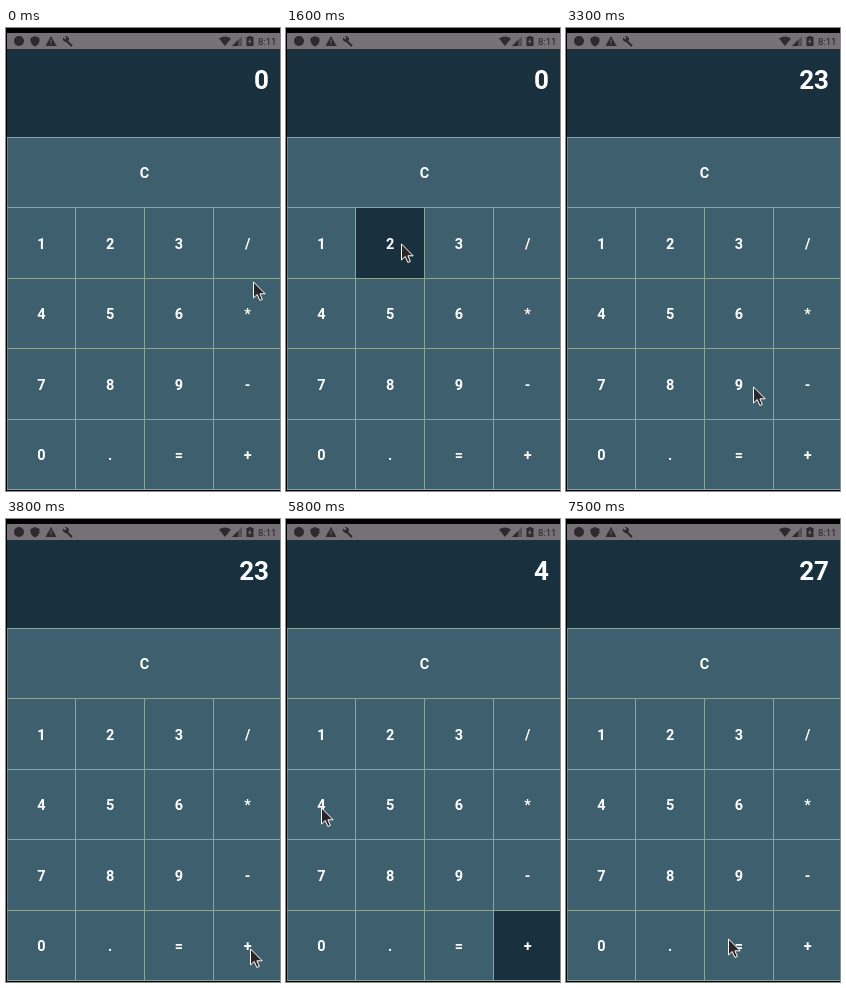
Recreate the animation shown at these times as an HTML page. Size 274x463 px, loop 8 s.

```html
<!DOCTYPE html>
<html lang="en">
<head>
<meta charset="utf-8">
<title>Calculator</title>
<style>
  html, body { margin: 0; width: 100%; height: 100%; overflow: hidden; background: #000; }
  svg { display: block; width: 100%; height: 100%; }
  text { font-family: Roboto, sans-serif; fill: #fff; }
  rect { shape-rendering: crispEdges; }
  #keys text { font-size: 14.5px; font-weight: 700; text-anchor: middle; }
  #display { font-size: 26px; font-weight: 700; text-anchor: end; }
  #clock { font-size: 9.6px; fill: #242226; }
</style>
</head>
<body>
<svg viewBox="0 0 274 463">
  <rect width="274" height="463" fill="#000"/>
  <rect x="1" y="5" width="273" height="16" fill="#757176"/>
  <g fill="#2c2a2d">
    <circle cx="13" cy="13" r="5"/>
    <path d="M29 8L33.5 10V13Q33 16.500 29 18.500Q25 16.500 24.500 13V10Z"/>
    <path d="M45 8L50.500 18H39.500Z"/>
    <path d="M44.500 11.500h1v3h-1zM44.500 15.500h1v1h-1z" fill="#757176"/>
    <path d="M60 12.500L66 18" stroke="#2c2a2d" stroke-width="2.300"/>
    <path d="M57 9.500L59.500 11.500L60.500 9.500L58.500 8Q62.500 7.500 63 11Q62.500 14.500 59 13.800Q56 12.500 57 9.500Z"/>
    <path d="M213 10.500Q219 6.500 225 10.500L219 18Z"/>
    <path d="M236 8V18H226Z" opacity=".45"/>
    <path d="M232 12V18H226Z"/>
    <path d="M242.500 8h3v1h2v9h-7v-9h2z"/>
    <path d="M244.500 10L242 14h1.700l-.7 3 2.700-4h-1.700z" fill="#757176"/>
  </g>
  <text id="clock" x="252" y="17">8:11</text>
  <rect x="1" y="21" width="273" height="88" fill="#19313f"/>
  <text id="display" x="263" y="61">0</text>
  <rect x="1" y="109" width="273" height="353" fill="#8aa59b"/>
  <g id="keys"></g>
  <rect x="1" y="109" width="1" height="353" fill="#8aa59b" opacity=".5"/>
  <path id="cursor" d="M.5 .9V17L4.200 13.500L6.900 19.500L9.400 18.400L6.900 12.800H12.200Z"
        fill="#2e2529" stroke="#fff" stroke-linejoin="round"/>
</svg>
<script>
const LOOP = 8000, TICK = 100;
const keyWidth = 68.75, keyHeight = 70.5, keysLeft = 1, keysTop = 109;
const idle = '#3e5f6d', pressed = '#19313f';

const readings = { 0: '0', 1800: '2', 2900: '23', 4400: '0', 5800: '4', 7500: '27' };
const presses = { 2: [1600, 1900], 3: [2700, 2900], '+': [4200, 7500], 4: [5500, 5800], '=': [7300, 7500] };

// Each move curves from the previous stop through a bend, slowing towards its end
const home = [247, 253];
const moves = [
  { start: 200, end: 1200, bend: [45, 440], to: [115, 215], power: 2 },
  { start: 2000, end: 2500, bend: [155, 235], to: [162, 221], power: 2 },
  { start: 3100, end: 3800, bend: [173, 395], to: [244, 429], power: 2 },
  { start: 4600, end: 5300, bend: [-14, 325], to: [35, 288], power: 3 },
  { start: 6200, end: 7000, bend: [85, 365], to: [162, 419], power: 2 }
];

const byId = id => document.getElementById(id);
const keyRects = {};

function add(tag, attributes, label = '') {
  const node = document.createElementNS('http://www.w3.org/2000/svg', tag);
  for (const name in attributes) node.setAttribute(name, attributes[name]);
  node.textContent = label;
  return byId('keys').appendChild(node);
}

function addKey(label, row, column, span = 1) {
  const columnLine = i => i ? Math.floor(keysLeft + i * keyWidth) : 0;
  const rowLine = i => Math.floor(keysTop + i * keyHeight);
  const x = columnLine(column) + 1, y = rowLine(row) + 1;
  const width = columnLine(column + span) - x, height = rowLine(row + 1) - y;
  keyRects[label] = add('rect', { x, y, width, height, fill: idle });
  add('text', { x: keysLeft + (column + span / 2) * keyWidth, y: y + height / 2 + 5.5 }, label);
}

addKey('C', 0, 0, 4);
['123/', '456*', '789-', '0.=+'].forEach((line, row) =>
  [...line].forEach((label, column) => addKey(label, row + 1, column)));

function pointerAt(time) {
  let from = home;
  for (const { start, end, bend, to, power } of moves) {
    if (time <= start) break;
    const progress = Math.min(1, (time - start) / (end - start));
    const rest = (1 - progress) ** power, done = 1 - rest;
    from = from.map((value, i) => rest * rest * value + 2 * rest * done * bend[i] + done * done * to[i]);
  }
  return from.map(Math.round);
}

function draw(now) {
  const time = Math.floor(now % LOOP / TICK) * TICK;
  const shownSince = Object.keys(readings).filter(start => start <= time).pop();
  byId('display').textContent = readings[shownSince];
  for (const label in presses) {
    const [start, end] = presses[label];
    keyRects[label].setAttribute('fill', time >= start && time < end ? pressed : idle);
  }
  byId('cursor').setAttribute('transform', `translate(${pointerAt(time)})`);
  requestAnimationFrame(draw);
}
draw(0);
</script>
</body>
</html>
```
